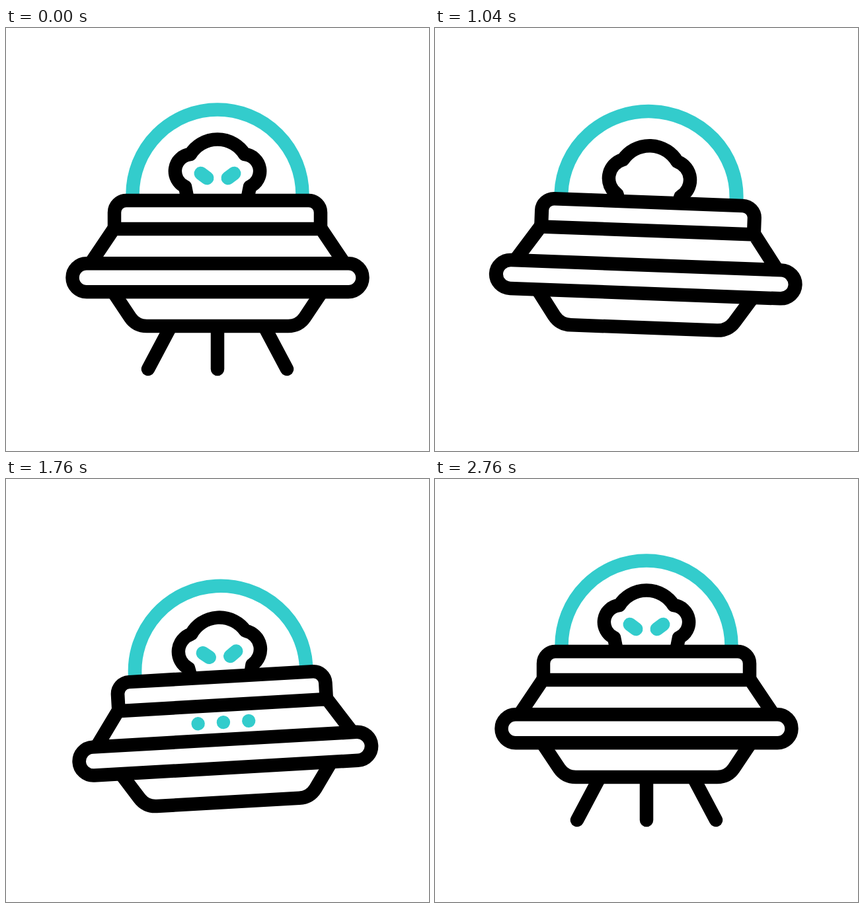
Write an HTML page that moves like this. It is 640 px wide and 640 px high and loops after 3 s.

```html
<!DOCTYPE html>
<html lang="en">
<head>
<meta charset="utf-8">
<title>Flying saucer</title>
<style>
  html, body { margin: 0; height: 100%; overflow: hidden; background: #fff; }
  svg { display: block; width: 100%; height: 100%; }
  .line { fill: none; stroke: #000; stroke-width: 20.5; stroke-linecap: round; stroke-linejoin: round; }
  .teal { stroke: #3cc; }
  .solid { fill: #fff; }
  .butt { stroke-linecap: butt; }
  .lights { fill: #3cc; }
</style>
</head>
<body>
<svg viewBox="0 0 640 640">
  <defs><clipPath id="face"><path class="skull"/></clipPath></defs>
  <g id="ship">
    <g id="legs" class="line"><path/><path/><path/></g>
    <g class="wide">
      <path class="line teal butt" d="M191.5 261V252A128.5 128.5 0 0 1 448.5 252V261"/>
    </g>
    <g id="head">
      <g id="eyes" class="line teal" clip-path="url(#face)"><path/><path/></g>
      <path class="line skull"/>
    </g>
    <g class="wide">
      <path class="line solid butt" d="M164 304V279A18 18 0 0 1 182 261H458A18 18 0 0 1 476 279V304"/>
      <path class="solid" d="M163 304L128 356H512L477 304Z"/>
    </g>
    <g class="lights" id="lights">
      <circle cy="330" r="10.2"/><circle cy="330" r="10.2"/><circle cy="330" r="10.2"/>
    </g>
    <g class="wide">
      <path class="line" d="M128 356L163 304H477L512 356"/>
      <path class="line solid" d="M162 399L188 438Q197 451 213 451H427Q443 451 452 438L478 399"/>
      <rect class="line solid" x="100.5" y="356.2" width="439" height="43" rx="21.5"/>
    </g>
  </g>
</svg>
<script>
const LOOP = 3000, STEP = 20;
const $ = id => document.getElementById(id);
const all = sel => [...document.querySelectorAll(sel)];
const mix = (a, b, k) => a + (b - a) * k;

// Sine ease from 0 to 1 between two times.
const ease = (t, from, to) => {
  const u = Math.min(1, Math.max(0, (t - from) / (to - from)));
  return (1 - Math.cos(Math.PI * u)) / 2;
};

// Rests at 0, swings through the [time, value] peaks, rests at 0 again.
const swing = (start, peaks, end) => t => {
  let value = 0, last = start;
  for (const [time, peak] of [...peaks, [end, 0]]) {
    value = mix(value, peak, ease(t, last, time));
    last = time;
  }
  return value;
};

const shiftX = swing(440, [[800, 7.5], [1280, -10], [1790, 12], [2180, -6.5]], 2360);
const shiftY = swing(380, [[840, 63], [1300, -89], [1760, 38], [2280, -38]], 2720);
const tilt = swing(300, [[680, -3.1], [1320, 5.7], [1810, -3.5], [2200, 2.8]], 2360);
const sink = swing(340, [[940, 10.5], [1400, -9], [1800, 4]], 2100);
const turn = swing(680, [[1400, 1], [1500, 1]], 1940);
const stretch = t => 1 + 0.032 * Math.min(ease(t, 200, 1080), Math.max(0, (2300 - t) / 1260) ** 1.5);

// Three arcs on a neck; k rounds the chin as the head turns away.
function skull(k) {
  const neck = mix(42, 39, k), chin = mix(49, 47, k), chinY = mix(240, 245, k);
  const browY = mix(191, 188.5, k), cheek = mix(25.7, 33, k), crown = 48.6;
  return `M${320 - neck} 275L${320 - chin} ${chinY}A${cheek} ${cheek} 0 0 1 279 ${browY}
    A${crown} ${crown} 0 0 1 361 ${browY}
    A${cheek} ${cheek} 0 0 1 ${320 + chin} ${chinY}L${320 + neck} 275`;
}

// Details slide off past the right edge and come back from the left;
// p is 1 at the centre and 0 at the edge.
const around = (p, edge, offset) => (p.side * edge * (1 - p.size)) + offset * p.size;
const pass = (t, out0, out1, in0, in1) => t < out1
  ? { side: 1, size: 1 - ease(t, out0, out1) }
  : { side: -1, size: ease(t, in0, in1) };

const show = (el, on) => { el.style.display = on ? '' : 'none'; };
const legs = [...$('legs').children], eyes = [...$('eyes').children];
const lights = [...$('lights').children];
const wide = all('.wide'), skulls = all('.skull');

function draw(t) {
  $('ship').setAttribute('transform',
    `translate(${shiftX(t)} ${shiftY(t)}) rotate(${tilt(t)} 320 377.5)`);
  const s = stretch(t);
  wide.forEach(g => g.setAttribute('transform', `translate(${320 * (1 - s)} 0) scale(${s} 1)`));

  const out = 1 - ease(t, 180, 600) + ease(t, 2260, 2730);
  show($('legs'), out > 0);
  legs.forEach((leg, i) => {
    const side = i - 1;
    leg.setAttribute('d', `M${320 + 70 * side} 450l${35 * side * out} ${66 * out}`);
  });

  $('head').setAttribute('transform', `translate(0 ${sink(t)})`);
  const d = skull(turn(t));
  skulls.forEach(el => el.setAttribute('d', d));

  const look = pass(t, 660, 1020, 1220, 1720);
  show($('eyes'), look.size > 0);
  eyes.forEach((eye, i) => {
    const dir = i ? 1 : -1;
    const x = 320 + around(look, 74, dir * 20.5);
    const dx = -dir * 4.7 * look.size, dy = mix(6.5, 3.5, look.size);
    eye.setAttribute('d', `M${x - dx} ${223.5 - dy}L${x + dx} ${223.5 + dy}`);
  });

  const spin = pass(t, 660, 1020, 1280, 1770);
  show($('lights'), spin.size > 0);
  lights.forEach((dot, i) => {
    dot.setAttribute('cx', 320 + around(spin, 174 * s, (i - 1) * 38.4));
    const on = ease(t, 260 + 100 * i, 400 + 100 * i);
    const off = ease(t, 2450 + 80 * i, 2590 + 80 * i);
    dot.setAttribute('opacity', on * (1 - off));
  });
}

function tick() {
  const t = performance.now() % LOOP;
  draw(Math.floor(t / STEP) * STEP);
  requestAnimationFrame(tick);
}
tick();
</script>
</body>
</html>
```
